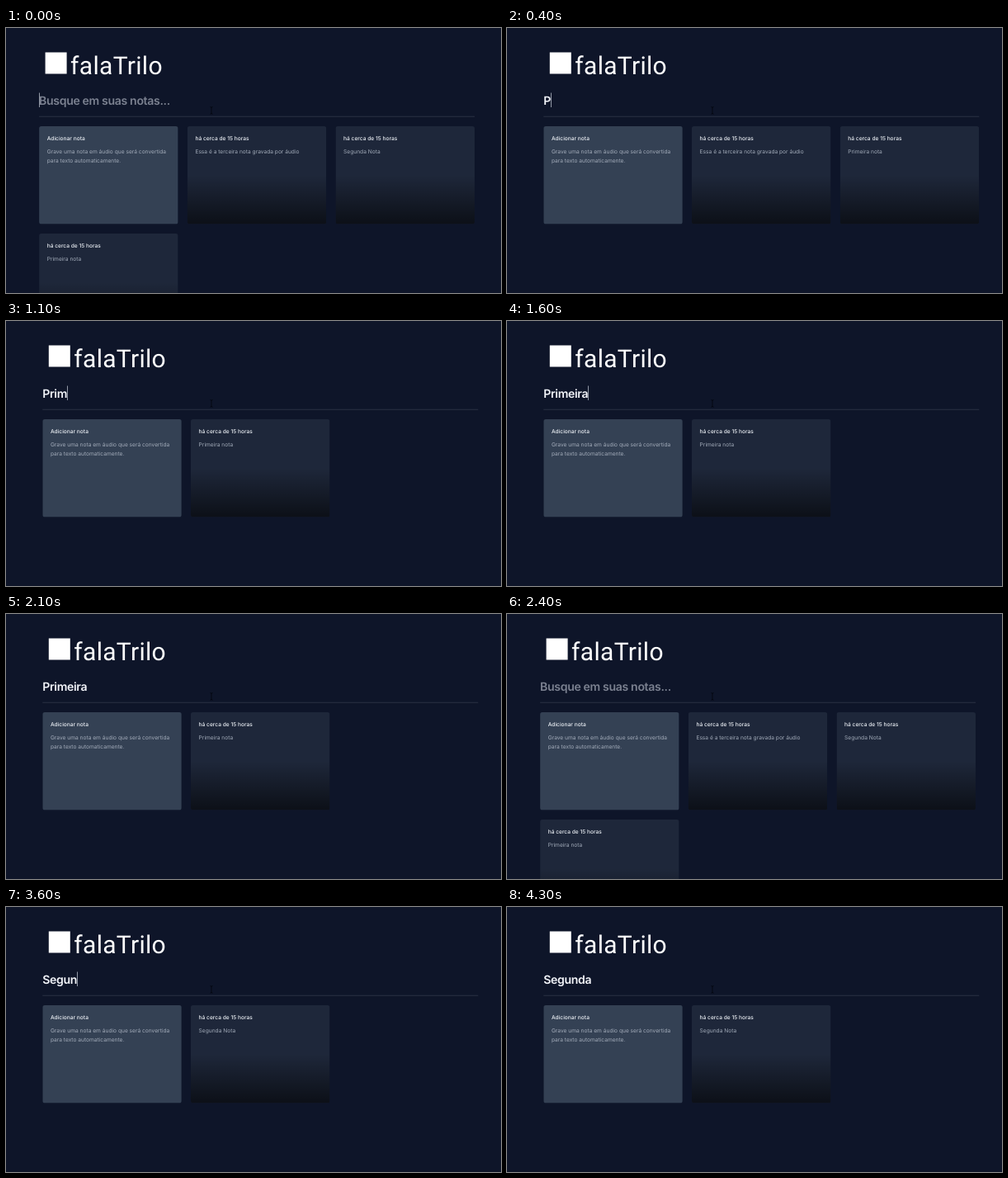
These frames come from a looping animation (600x321 px, 4600 ms). An HTML page:

```html
<!DOCTYPE html>
<html lang="pt-BR">
<head>
<meta charset="utf-8">
<title>Notas</title>
<style>
  html, body { margin: 0; width: 100%; height: 100%; overflow: hidden; background: #0e1529; }
  svg { display: block; width: 100%; height: 100%; }
  text { font-family: Inter, sans-serif; text-rendering: geometricPrecision; white-space: pre; }
  .brand { font: 400 30px Roboto, sans-serif; fill: #fff; letter-spacing: .3px; }
  .search { font-size: 14.1px; font-weight: 600; letter-spacing: -.025em; fill: #f3f5fa; }
  .search.placeholder { fill: #7b8190; }
  .title { font-size: 6.63px; font-weight: 500; fill: #eef2f7; }
  .body { font-size: 6.63px; fill: #a3acba; }
</style>
</head>
<body>
<svg viewBox="0 0 600 321">
  <defs>
    <linearGradient id="shade" x1="0" y1="1" x2="0" y2="0">
      <stop offset="0" stop-color="#000" stop-opacity=".6"/>
      <stop offset="1" stop-color="#000" stop-opacity="0"/>
    </linearGradient>
    <clipPath id="cardShape"><rect width="168.5" height="118.6" rx="2.8"/></clipPath>
  </defs>
  <g id="page">
    <rect x="7.5" y="29.5" width="26" height="26" fill="#fff"/>
    <text class="brand" x="38" y="56">falaTrilo</text>
    <text id="search" class="search" y="92.6"></text>
    <rect id="caret" y="78.5" width=".8" height="17.5" fill="#b4bac6"/>
    <rect y="106.8" width="528" height=".8" fill="#30384a"/>
    <g id="cards"></g>
  </g>
  <path d="M247.5 95.5q1.5 0 1.5 1.2v6.4q0 1.2-1.5 1.2M250.5 95.5q-1.5 0-1.5 1.2M249 103.1q0 1.2 1.5 1.2"
        fill="none" stroke="#03060f" stroke-width=".8"/>
</svg>
<script>
const LOOP = 4600;
const COLUMN = 179.7, ROW = 130;
const notes = ['Essa é a terceira nota gravada por áudio', 'Segunda Nota', 'Primeira nota'];
const typing = [
  [0, ''], [400, 'P'], [900, 'Pr'], [1000, 'Pri'], [1100, 'Prim'], [1200, 'Prime'],
  [1300, 'Primei'], [1400, 'Primeir'], [1600, 'Primeira'],
  [2400, ''], [2800, 'S'], [3500, 'Seg'], [3600, 'Segun'], [3700, 'Segunda']
];
const caretHidden = [[2100, 2500], [4300, LOOP]];

const byId = id => document.getElementById(id);
const page = byId('page'), search = byId('search'), caret = byId('caret'), cards = byId('cards');

function card(index, title, lines, fill, shaded) {
  const x = index % 3 * COLUMN, y = 119 + Math.floor(index / 3) * ROW;
  const body = lines.map((line, i) =>
    `<text class="body" x="9.6" y="${32.8 + i * 11.35}">${line}</text>`).join('');
  const shade = shaded ? '<rect y="59.3" width="168.5" height="59.3" fill="url(#shade)"/>' : '';
  return `<g transform="translate(${x} ${y})" clip-path="url(#cardShape)">
    <rect width="168.5" height="118.6" fill="${fill}"/>
    <text class="title" x="9.6" y="16.7">${title}</text>${body}${shade}</g>`;
}

function showQuery(query) {
  const found = notes.filter(note => note.toLowerCase().includes(query.toLowerCase()));
  // The page is re-centred when it no longer needs a scrollbar.
  page.setAttribute('transform', `translate(${found.length > 2 ? 40.1 : 44.3} 0)`);
  search.textContent = query || 'Busque em suas notas...';
  search.classList.toggle('placeholder', !query);
  caret.setAttribute('x', query ? search.getComputedTextLength() : 0);
  cards.innerHTML =
    card(0, 'Adicionar nota',
      ['Grave uma nota em áudio que será convertida', 'para texto automaticamente.'], '#344154', false) +
    found.map((note, i) => card(i + 1, 'há cerca de 15 horas', [note], '#1e273a', true)).join('');
}

let shown = null;
function frame() {
  const time = performance.now() % LOOP;
  const query = typing.findLast(([start]) => start <= time)[1];
  if (query !== shown) showQuery(shown = query);
  const hidden = caretHidden.some(([from, to]) => time >= from && time < to);
  caret.setAttribute('visibility', hidden ? 'hidden' : 'visible');
  requestAnimationFrame(frame);
}
frame();
</script>
</body>
</html>
```
